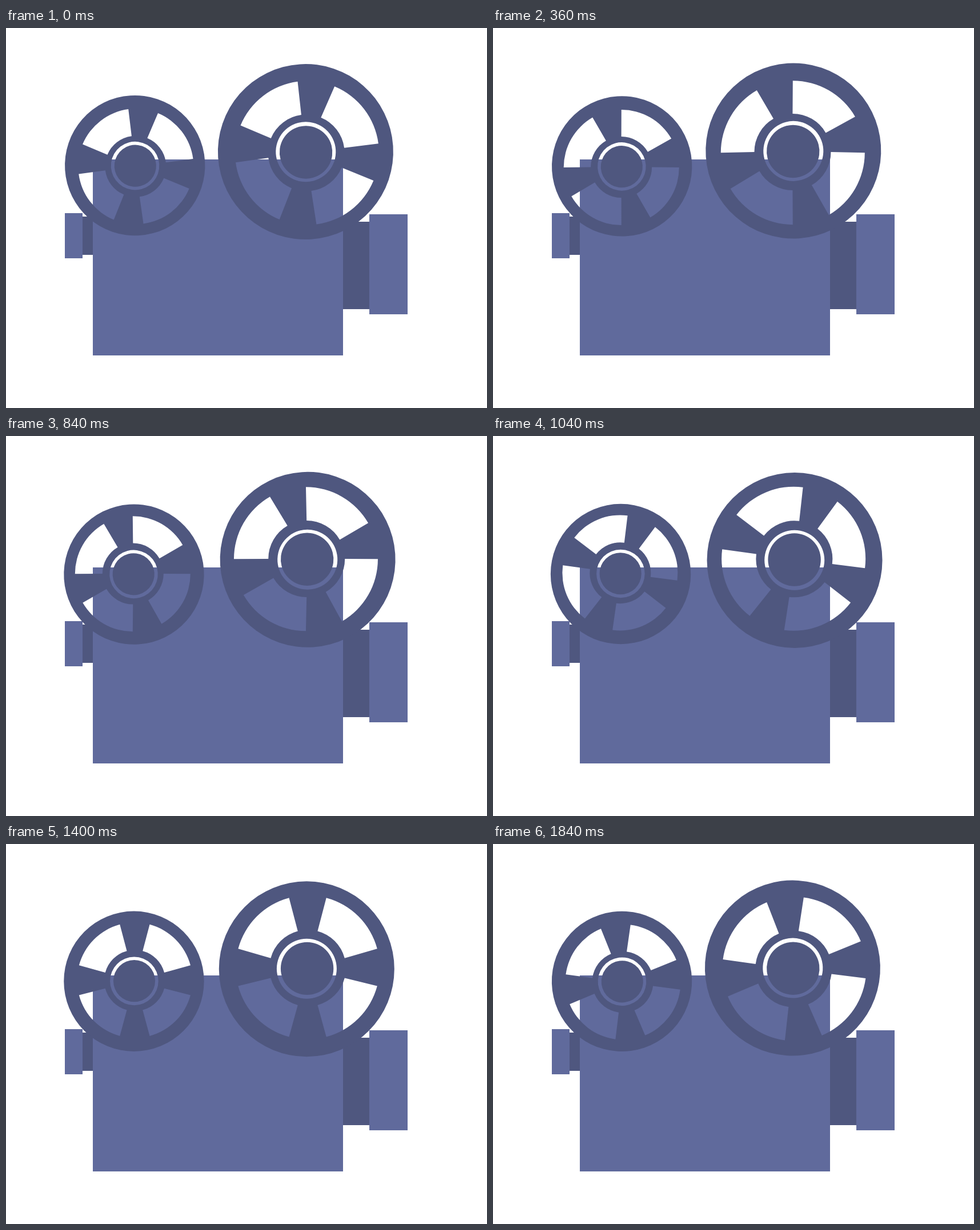
An HTML page with a canvas that plays this animation: 842x665 px, repeating every 1.92 s.

```html
<!DOCTYPE html>
<html lang="en">
<head>
<meta charset="utf-8">
<title>Film camera</title>
<style>
html, body { margin: 0; width: 100%; height: 100%; overflow: hidden; background: #fff; }
canvas { display: block; }
</style>
</head>
<body>
<canvas id="stage" width="842" height="665"></canvas>
<script>
const ctx = document.getElementById('stage').getContext('2d');
const LIGHT = '#606a9c', DARK = '#4f577f';
const LOOP = 1920, STEP = 40, LAST = 46;
const rad = deg => deg * Math.PI / 180;

// Each part is [dx, dy, radius] around the pivot; small offsets make the reel wobble.
const reels = [
  { x: 224.7, y: 241.2, rim: [0.95, -0.75, 122.7], slot: [2.8, 0.7, 101],
    hub: [2.3, 0.7, 53.5], gap: [1.3, -0.3, 42.3], cap: [1.6, -0.2, 36.6] },
  { x: 526.3, y: 216.8, rim: [-1.9, 0, 153.5], slot: [0.9, 1.8, 126],
    hub: [-0.4, 1.8, 67], gap: [-1.5, 0.1, 52.5], cap: [-1.1, 0.8, 46.2] }
];

function box(color, left, top, right, bottom) {
  ctx.fillStyle = color;
  ctx.fillRect(left, top, right - left, bottom - top);
}

function circle([x, y, r]) {
  ctx.moveTo(x + r, y);
  ctx.arc(x, y, r, 0, 2 * Math.PI);
  ctx.closePath();
}

function drawReel({ x, y, rim, slot, hub, gap, cap }, turn) {
  ctx.save();
  ctx.translate(x, y);
  ctx.rotate(turn);
  ctx.beginPath();
  [rim, gap, cap].forEach(circle);
  for (let a = 15; a < 360; a += 90) {
    const from = rad(a), to = rad(a + 60);
    ctx.moveTo(slot[0] + slot[2] * Math.cos(from), slot[1] + slot[2] * Math.sin(from));
    ctx.arc(...slot, from, to);
    ctx.arc(...hub, to, from, true);
    ctx.closePath();
  }
  ctx.fillStyle = DARK;
  ctx.fill('evenodd');
  ctx.restore();
}

function draw(time) {
  const step = Math.min(LAST, Math.floor(time % LOOP / STEP));
  box('#fff', 0, 0, 842, 665);
  box(DARK, 134, 330, 152, 397);
  box(LIGHT, 103, 324, 134, 403);
  box(DARK, 590, 339, 636, 492);
  box(LIGHT, 636, 326, 703, 501);
  box(LIGHT, 152, 230, 590, 573);
  reels.forEach(reel => drawReel(reel, rad(7.5 * (step + 1))));
}

const start = performance.now();
function tick() {
  draw(performance.now() - start);
  requestAnimationFrame(tick);
}
tick();
</script>
</body>
</html>
```
